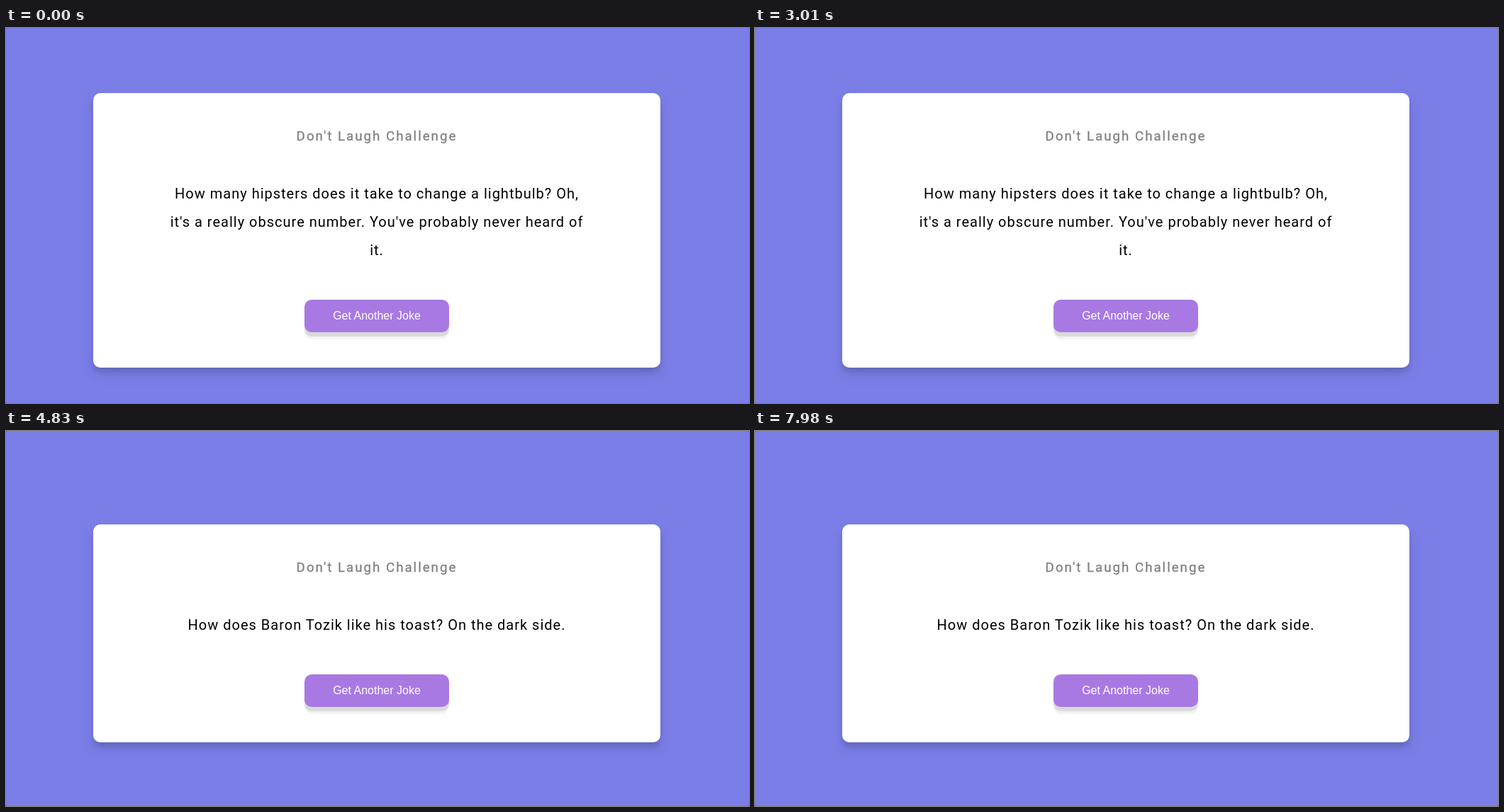
Animation, 1048 px wide and 530 px high, one loop 8 s. Source, as an HTML page:

```html
<!DOCTYPE html>
<html lang="en">
<head>
<meta charset="utf-8">
<title>Don't Laugh Challenge</title>
<style>
  html, body { margin: 0; width: 100%; height: 100%; overflow: hidden; background: #4a4b8c; }
  .stage {
    position: relative; width: 1048px; height: 530px;
    background: #7b7ee7; border-radius: 2px;
    font-family: Roboto, sans-serif; text-align: center;
  }
  .card {
    position: absolute; left: 123px; top: 286px; transform: translateY(-50%);
    box-sizing: border-box; width: 800px; padding: 50px 20px;
    background: #fff; border-radius: 10px;
    box-shadow: 0 10px 20px rgba(0, 0, 0, .1), 0 6px 6px rgba(0, 0, 0, .1);
  }
  h3 {
    margin: 0; font-size: 18.72px; font-weight: 400; line-height: 22px;
    letter-spacing: 2px; color: #808080; -webkit-text-stroke: .3px #808080;
  }
  .joke {
    margin: 50px auto; font-size: 20px; line-height: 40px;
    letter-spacing: 1px; color: #000; white-space: pre;
  }
  .button {
    width: 204px; height: 46px; margin: 0 auto; border-radius: 10px;
    background: #a879e3; color: #fff;
    font: 16px/46px "Liberation Sans", Arial, sans-serif;
    box-shadow: 0 6px 1px #dadada, 0 11px 1px -1px #f3f3f3;
  }
</style>
</head>
<body>
<div class="stage">
  <div class="card">
    <h3>Don't Laugh Challenge</h3>
    <div class="joke"></div>
    <div class="button">Get Another Joke</div>
  </div>
</div>
<script>
  const LOOP = 8000, SWITCH = 3500;
  const jokes = [
    "How many hipsters does it take to change a lightbulb? Oh,\n" +
    "it's a really obscure number. You've probably never heard of\nit.",
    "How does Baron Tozik like his toast? On the dark side."
  ];
  const joke = document.querySelector(".joke");
  const start = performance.now();

  function draw() {
    const time = (performance.now() - start) % LOOP;
    const text = jokes[time < SWITCH ? 0 : 1];
    if (joke.textContent !== text) joke.textContent = text;
    requestAnimationFrame(draw);
  }
  draw();
</script>
</body>
</html>
```
